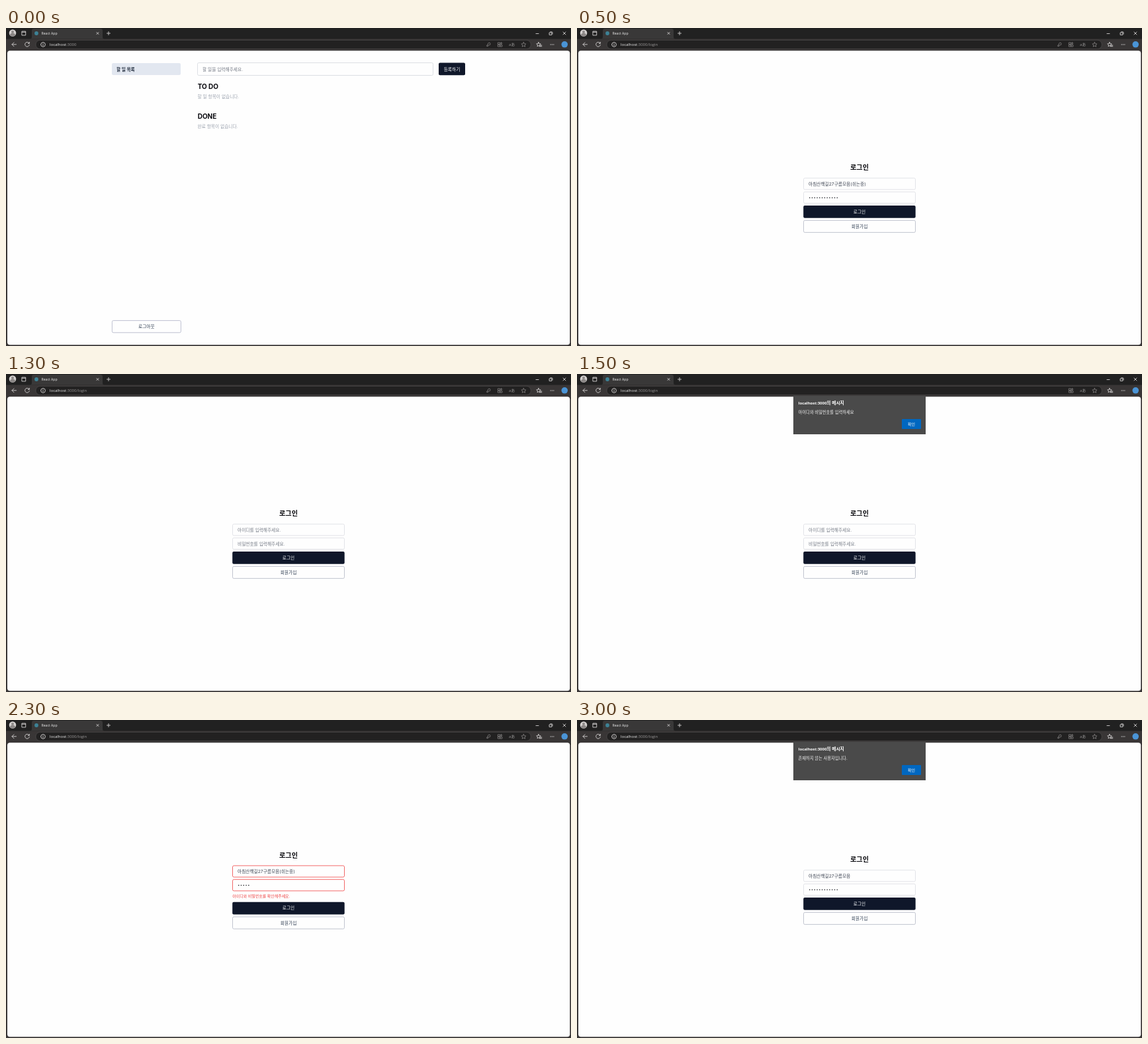
Write an HTML page that moves like this. It is 854 px wide and 480 px high and loops after 3.5 s.

```html
<!DOCTYPE html>
<html lang="ko">
<head>
<meta charset="utf-8">
<title>React App</title>
<style>
html, body { margin: 0; width: 100%; height: 100%; overflow: hidden; background: #393636; }
svg { display: block; width: 854px; height: 480px; }
text { font-family: Inter, "Noto Sans CJK KR", "Noto Sans CJK", sans-serif; font-size: 6.7px; white-space: pre; }
.ui { font-family: "Open Sans", "Noto Sans CJK KR", "Noto Sans CJK", sans-serif; font-size: 6px; }
.b { font-weight: 700; }
.m { font-weight: 500; }
.mid { text-anchor: middle; }
.icon { fill: none; stroke: #d4d2d2; stroke-width: .9; stroke-linecap: round; stroke-linejoin: round; }
.dim { stroke: #878585; stroke-width: .8; }
.scene { visibility: hidden; animation: slot 3500ms step-end infinite; animation-delay: calc((var(--i) - 7) * 500ms); }
@keyframes slot {
  0% { visibility: visible; }
  14.285714% { visibility: hidden; }
}
</style>
</head>
<body>
<svg id="stage" viewBox="0 0 854 480"></svg>
<script>
const INK = '#0f172a', SLATE = '#334155', HINT = '#757b86', LINE = '#dcdee3', RED = '#ef4444';

const text = (x, y, s, fill, cls = '') => `<text x="${x}" y="${y}" fill="${fill}" class="${cls}">${s}</text>`;
const box = (x, y, w, h, fill, stroke = 'none', r = 2) =>
  `<rect x="${x}" y="${y}" width="${w}" height="${h}" rx="${r}" fill="${fill}" stroke="${stroke}" stroke-width=".8"/>`;
const disc = (x, y, r, fill) => `<circle cx="${x}" cy="${y}" r="${r}" fill="${fill}"/>`;
const icon = (d, cls = '') => `<path class="icon ${cls}" d="${d}"/>`;
const scene = (i, body) => `<g class="scene" style="--i:${i}">${body}</g>`;

function star(x, y, r) {
  const pts = Array.from({ length: 10 }, (_, k) => {
    const a = k * Math.PI / 5 - Math.PI / 2, q = k % 2 ? r * .48 : r;
    return `${(x + q * Math.cos(a)).toFixed(2)} ${(y + q * Math.sin(a)).toFixed(2)}`;
  });
  return `M${pts.join('L')}Z`;
}

const chrome = () => `
  <rect width="854" height="480" fill="#393636"/>
  <rect width="854" height="16.5" fill="#212121"/>
  <path d="M36 16.5q3 0 3-3V4q0-3 3-3h101q3 0 3 3v9.500q0 3 3 3z" fill="#393838"/>
  ${disc(10, 7.5, 5.3, '#d3d0cf')}${disc(10, 6, 2, '#8b8786')}
  <path d="M6 10.800a4 3 0 0 1 8 0a5.300 5.300 0 0 1-8 0z" fill="#8b8786"/>
  ${icon('M24.300 5h5.400v6h-5.400zM24.300 6.300h5.400')}
  ${disc(46, 8, 2.9, '#3d8296')}
  <text x="53.500" y="10" fill="#ececec" class="ui" style="font-size:5.150px">React App</text>
  ${icon('M137 6.500l3 3m0-3l-3 3M152.500 8h5M155 5.500v5')}
  ${icon('M801 8.500h4M821.500 7h3.400v3.400h-3.400zM822.700 5.800h2.200q1.100 0 1.100 1.100v2.200M842 6l4 4m0-4l-4 4', 'thin')}
  ${icon('M15.500 24.800H9M12 21.800l-3 3l3 3M35 23a3.400 3.400 0 1 0 .400 2.500M35.300 21.300v2h-2')}
  ${box(44.900, 18.300, 748.500, 13.400, '#222121', '#4d4b4b', 6.700)}
  ${icon('M52.600 25a3.400 3.400 0 1 0 6.800 0a3.400 3.400 0 1 0-6.800 0M56 24.700v2M56 23.100v.1')}
  ${icon('M743.800 22h2.700v2.700h-2.700zM743.800 25.400h2.700v2.700h-2.700zM747.200 25.400h2.700v2.700h-2.700zM748.600 21.500v3M747.100 23h3', 'dim')}
  ${text(764.7, 27, 'aあ', '#969494', 'ui mid')}
  ${icon(star(782.4, 25.2, 3.7), 'dim')}
  ${icon(star(805, 25, 3.4) + 'M807.300 26h2.500M806.500 27.700h3.300')}
  ${[823.2, 825.5, 827.8].map(x => disc(x, 25, .65, '#d4d2d2')).join('')}
  ${disc(844.3, 24.8, 4.8, '#4a94d6')}
  ${box(2, 34.3, 850.3, 443.9, '#fefefe', 'none', 4)}`;

const key = icon('M728.600 24.800a1.800 1.800 0 1 1 1.500 1l-.800.800h-1v1h-1.500v-1.300z', 'dim');

const url = path => `<text x="66" y="27.100" fill="#efefef" class="ui">localhost<tspan fill="#9a9898">:3000${path}</tspan></text>`;

const home = () => url('') + key
  + box(160, 53, 104, 18, '#e2e7f0') + text(167, 64.6, '할 일 목록', '#1e293b', 'b')
  + box(289.5, 52.5, 356, 19, '#fefefe', '#d5d8de') + text(297, 64.8, '할 일을 입력해주세요.', HINT)
  + box(654, 52.5, 40, 18.7, INK) + text(674, 64.5, '등록하기', '#f8fafc', 'm mid')
  + `<g style="font-size:10px">${['TO DO', 'DONE'].map((s, k) =>
      `<text x="289.700" y="${91.6 + 45.2 * k}" class="b" fill="#0a0a0f" style="font-size:10px">${s}</text>`).join('')}</g>`
  + text(289.5, 105.9, '할 일 항목이 없습니다.', '#9ca3af') + text(289.5, 151.2, '완료 항목이 없습니다.', '#9ca3af')
  + box(160.4, 441.6, 104, 18.2, '#fefefe', '#aeb2c6') + text(212.3, 453.1, '로그아웃', SLATE, 'mid');

const dots = (n, y) => Array.from({ length: n }, (_, k) => disc(351.7 + k * 3.78, y, .8, '#14161c')).join('');

// Without a user the fields show their hints; an error spreads the form apart.
function login({ user, count, error, alert, hasKey = true }) {
  const up = error ? -6.7 : 0, down = error ? 6.7 : 0, edge = error ? RED : LINE;
  return url('/login') + (hasKey ? key : '')
    + `<text x="427" y="${214.3 + up}" class="b mid" fill="#0a0a0f" style="font-size:10.100px">로그인</text>`
    + box(342.5, 226.6 + up, 169, 17.2, '#fefefe', edge)
    + text(350, 237.7 + up, user || '아이디를 입력해주세요.', user ? '#3f4654' : HINT)
    + box(342.5, 247.4 + up, 169, 17.2, '#fefefe', edge)
    + (user ? dots(count, 256.2 + up) : text(350, 258.5, '비밀번호를 입력해주세요.', HINT))
    + (error ? `<text x="342.300" y="268.200" fill="${RED}" style="font-size:5.950px">${error}</text>` : '')
    + box(342.2, 268 + down, 169.5, 18.7, INK) + text(427, 279.7 + down, '로그인', '#f8fafc', 'm mid')
    + box(342.5, 290.4 + down, 169, 18.2, '#fefefe', '#b3b7c5') + text(427, 301.9 + down, '회원가입', SLATE, 'mid')
    + (alert ? dialog(alert) : '');
}

const dialog = msg => box(327, 33, 200, 58, '#4a4a4a', 'none', 0)
  + text(334.6, 46.3, 'localhost:3000<tspan style="font-size:6.700px">의 메시지</tspan>', '#fff', 'ui b')
  + `<text x="334.600" y="59.500" fill="#f4f4f4" class="ui" style="font-size:6.270px">${msg}</text>`
  + box(491, 68, 29, 15, '#0067c0', 'none', 1) + text(505.5, 77.7, '확인', '#fff', 'ui mid');

const shortId = '아침산책길27구름모음', longId = shortId + '(쉬는중)';
const scenes = [
  home(),
  login({ user: longId, count: 12 }),
  login({}),
  login({ alert: '아이디와 비밀번호를 입력하세요', hasKey: false }),
  login({ user: longId, count: 5, error: '아이디와 비밀번호를 확인해주세요.' }),
  login({ user: longId, count: 13, alert: '비밀번호가 일치하지 않습니다.' }),
  login({ user: shortId, count: 12, alert: '존재하지 않는 사용자입니다.' })
];
document.getElementById('stage').innerHTML = chrome() + scenes.map((s, i) => scene(i, s)).join('');
</script>
</body>
</html>
```
